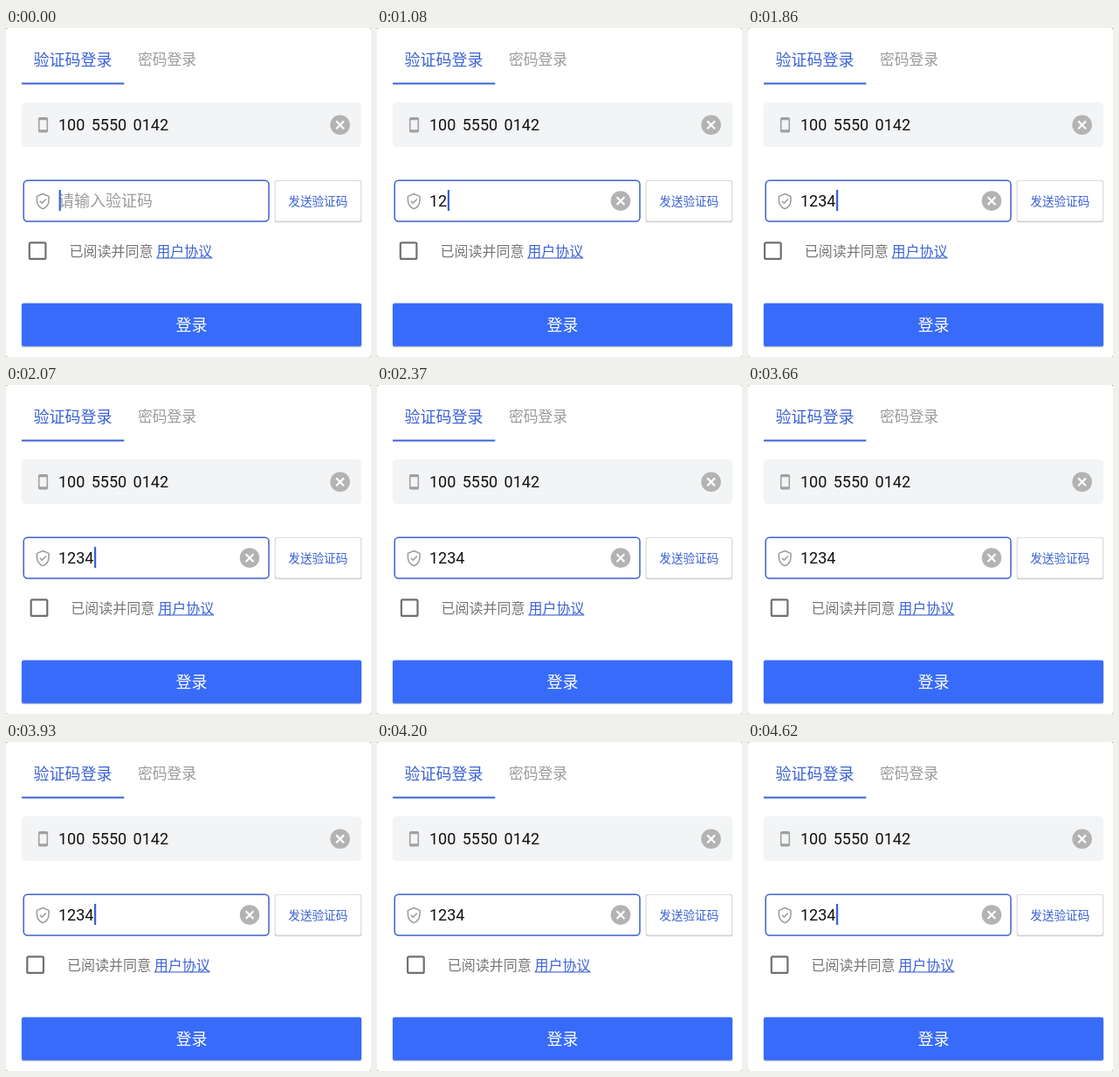
An HTML page that plays this animation: 418x376 px, repeating every 4.89 s.

```html
<!DOCTYPE html>
<html lang="zh-CN">
<head>
<meta charset="utf-8">
<title>登录</title>
<style>
  html, body { margin: 0; width: 100%; height: 100%; overflow: hidden; background: #fff; }
  svg { display: block; width: 100vw; height: 100vh; }
  text { font-family: "Noto Sans CJK SC", "Noto Sans CJK", "Noto Sans CJK JP", sans-serif; }
  .num { font: 18px Roboto, sans-serif; fill: #111; }
  .blue { fill: #3a62d4; }
</style>
</head>
<body>
<svg viewBox="0 0 418 376">
  <defs>
    <g id="cross">
      <circle r="11.3" fill="#b3b3b3"/>
      <path d="M-4.4-4.4 4.4 4.4M4.4-4.4-4.4 4.4" stroke="#fff" stroke-width="2.2"/>
    </g>
  </defs>
  <rect width="418" height="376" fill="#999"/>
  <rect width="418" height="376" rx="2.5" fill="#fff"/>

  <text class="blue" x="31.5" y="42.8" font-size="18">验证码登录</text>
  <text x="151" y="42.2" font-size="16.8" fill="#9b9b9b">密码登录</text>
  <rect class="blue" x="18" y="62.5" width="117.3" height="2"/>

  <rect x="18" y="85" width="389" height="51" rx="4.5" fill="#f3f4f6"/>
  <path fill="#a0a0a0" fill-rule="evenodd" d="M38.7 102h7.6a1.8 1.8 0 0 1 1.8 1.8v13.9a1.8 1.8 0 0 1-1.8 1.8h-7.6a1.8 1.8 0 0 1-1.8-1.8v-13.9a1.8 1.8 0 0 1 1.8-1.8zM38.5 105.2v11h8v-11z"/>
  <text class="num" x="60" y="117.4" style="word-spacing:2.9px">100 5550 0142</text>
  <use href="#cross" x="382.6" y="110.8"/>

  <rect x="20.2" y="174.2" width="280.8" height="46.8" rx="4.5" fill="#fff" stroke="#3d62cc" stroke-width="1.5"/>
  <g fill="none" stroke="#999" stroke-width="1.5">
    <path d="M42.2 189.5 49 192.4v4.4c0 4.6-2.8 8.4-6.8 9.8-4-1.4-6.8-5.2-6.8-9.8v-4.4z"/>
    <path d="m38.8 197.8 2.5 2.5 4.6-4.7"/>
  </g>
  <text id="hint" x="60" y="204.4" font-size="18" fill="#9b9b9b">请输入验证码</text>
  <text id="code" class="num" x="60" y="204.4"></text>
  <rect id="caret" class="blue" y="185" width="2.2" height="24"/>
  <use id="clear" href="#cross" x="279" y="197.6"/>

  <rect x="307.6" y="174" width="99.6" height="48.2" rx="2.5" fill="#d2d2d2"/>
  <rect x="308.6" y="174.8" width="97.6" height="45.8" rx="2" fill="#fff"/>
  <text class="blue" x="323.3" y="203" font-size="13.6">发送验证码</text>

  <g id="terms">
    <rect x="26.8" y="245.3" width="18.6" height="18.6" rx="1.5" fill="#fff" stroke="#707070" stroke-width="2.2"/>
    <text x="72.5" y="261" font-size="16" fill="#767676">已阅读并同意</text>
    <text class="blue" x="172.3" y="261" font-size="16">用户协议</text>
    <rect class="blue" x="172.3" y="262.4" width="64" height="1.1"/>
  </g>

  <rect x="17.6" y="315" width="389.8" height="50" rx="2.5" fill="#c9cbd2"/>
  <rect x="18" y="314.6" width="389" height="49.2" rx="2" fill="#386bfa"/>
  <text x="194.6" y="346.2" font-size="18" font-weight="500" fill="#fff">登录</text>
</svg>
<script>
  const LOOP = 4890, STEP = 30;
  const typed = [750, 1080, 1590, 1770];
  const blinks = [60, 510, 1560, 1590, 2310, 2790, 3240, 3720, 4200, 4620];
  const shakes = [1705, 3636], SHAKE = 715, REACH = 9;
  // Horizontal swing: [progress, direction]
  const keys = [[0, 0], [.1, -1], [.26, 1], [.42, -1], [.58, 1], [.74, -1], [.9, 1], [1, 0]];

  const get = id => document.getElementById(id);
  const [hint, code, caret, clear, terms] = ['hint', 'code', 'caret', 'clear', 'terms'].map(get);
  const passed = (list, t) => list.filter(at => t >= at).length;
  const show = (el, on) => el.setAttribute('visibility', on ? 'visible' : 'hidden');

  function swing(p) {
    if (p < .05 || p >= 1) return 0;
    const e = (1 - Math.cos(Math.PI * p)) / 2;
    const i = keys.findIndex(k => k[0] > e);
    const [a, from] = keys[i - 1], [b, to] = keys[i];
    return REACH * (from + (to - from) * (e - a) / (b - a));
  }

  function draw(ms) {
    const t = Math.floor(ms % LOOP / STEP) * STEP;
    const count = passed(typed, t);
    code.textContent = '1234'.slice(0, count);
    show(hint, !count);
    show(clear, t >= 780);
    show(caret, passed(blinks, t) % 2 === 0);
    caret.setAttribute('x', 60.6 + count * 10.1);
    const dx = shakes.reduce((sum, at) => sum + swing((t - at) / SHAKE), 0);
    terms.setAttribute('transform', `translate(${dx.toFixed(2)} 0)`);
  }

  let start;
  function tick(now) {
    start ??= now;
    draw(now - start);
    requestAnimationFrame(tick);
  }
  draw(0);
  requestAnimationFrame(tick);
</script>
</body>
</html>
```
